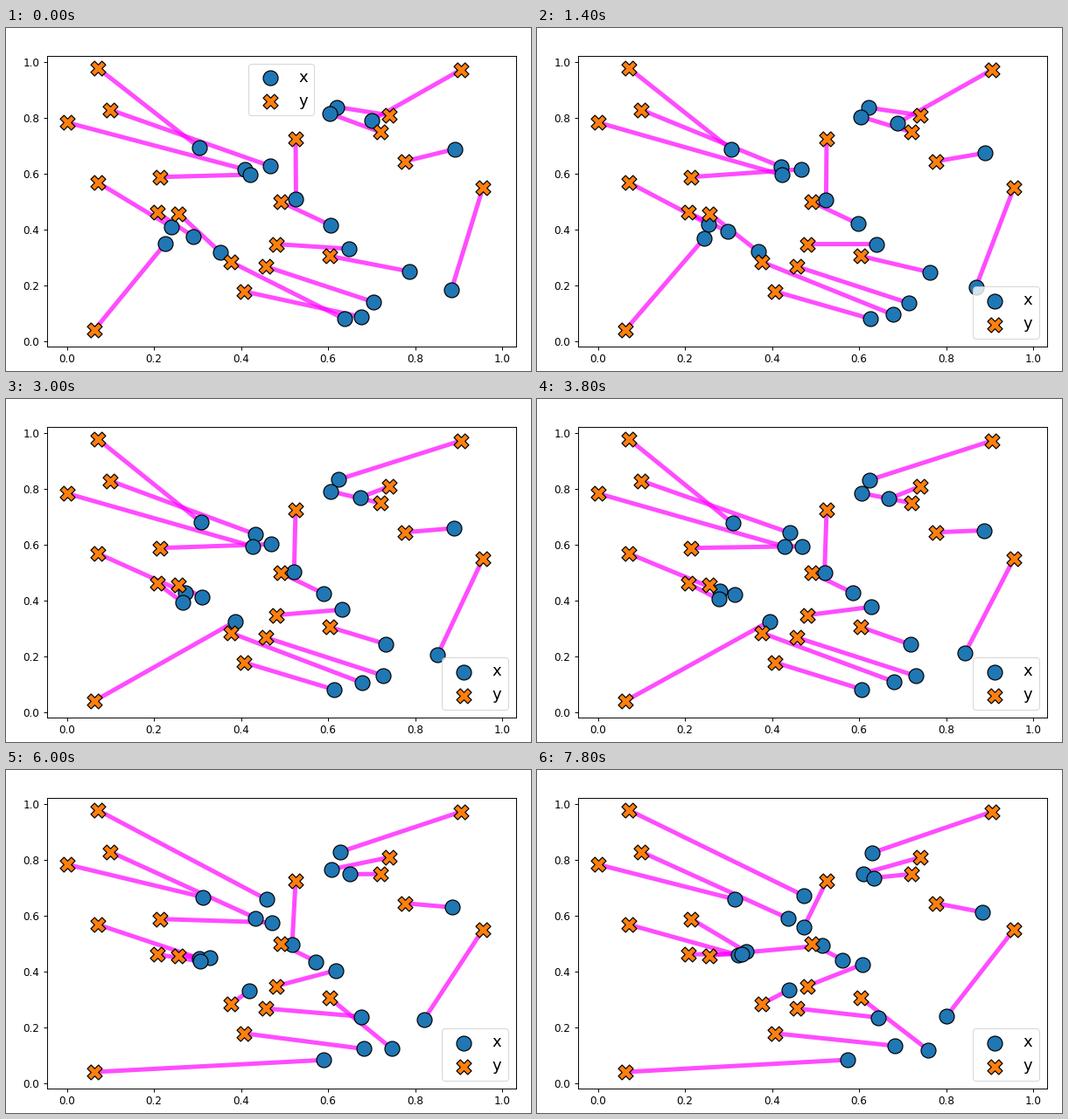
A matplotlib script that plays this animation: 600x393 px, repeating every 8 s.

```python
import numpy as np
import matplotlib.pyplot as plt
from matplotlib.animation import FuncAnimation
from matplotlib.collections import LineCollection

W, H, DPI = 600, 393, 72          # at 72 dpi one point is one pixel
FRAMES, INTERVAL = 40, 200
LEFT, RIGHT, TOP, BOTTOM = 46.5, 582.5, 31.5, 364.5
ORIGIN = np.array([69.6, 358.5])
UNIT = np.array([497.4, -319.5])  # pixels per data unit


def to_data(points):
    return (np.array(points) - ORIGIN) / UNIT


START = to_data([
    (221, 137), (301.5, 158), (273, 162), (279, 168), (189, 228),
    (214, 239), (182, 247), (245, 257), (331.4, 196.3), (371, 226),
    (392, 253), (461.5, 279), (420.3, 314), (406, 331), (386.5, 333.3),
    (509, 300), (378, 90.5), (369.5, 97.8), (418, 105.7), (513, 138.7)])
END = to_data([
    (226.3, 148.2), (305, 179.8), (305, 144), (287, 170), (230, 212),
    (239, 208), (234.5, 211), (288, 252), (325.7, 201.2), (349.5, 217.6),
    (372, 222.7), (390, 283.6), (447.3, 321), (409.3, 316), (355.4, 332),
    (468.3, 281.7), (382.8, 95), (372.7, 118.5), (385, 123.5), (509.5, 163)])
TARGETS = to_data([
    (105, 46), (119, 93.7), (70, 108.3), (105.3, 177.2), (176.3, 170.7),
    (172.7, 211.2), (197.3, 212.5), (101, 346), (257, 268), (271.6, 301.7),
    (296.6, 273.2), (308.7, 247.6), (370, 261.3), (313.5, 199), (331, 127),
    (427.7, 119.2), (438.4, 100), (520, 47.8), (456.3, 152.7), (545, 183)])


def assign(cost):
    """Hungarian algorithm: the column matched to every row."""
    n = len(cost)
    u, v = np.zeros(n), np.zeros(n + 1)
    owner = np.full(n + 1, -1)    # row held by each column, last is virtual
    for row in range(n):
        owner[n] = row
        col = n
        best = np.full(n, np.inf)
        prev = np.full(n, n)
        used = np.zeros(n + 1, bool)
        while owner[col] >= 0:
            used[col] = True
            r = owner[col]
            slack = cost[r] - u[r] - v[:n]
            better = ~used[:n] & (slack < best)
            best[better] = slack[better]
            prev[better] = col
            free = np.where(used[:n], np.inf, best)
            nxt = int(free.argmin())
            delta = free[nxt]
            u[owner[used]] += delta
            v[used] -= delta
            best[~used[:n]] -= delta
            col = nxt
        while col != n:
            owner[col] = owner[prev[col]]
            col = prev[col]
    return np.argsort(owner[:n])


fig = plt.figure(figsize=(W / DPI, H / DPI), dpi=DPI, facecolor="white")
ax = fig.add_axes([LEFT / W, 1 - BOTTOM / H, (RIGHT - LEFT) / W, (BOTTOM - TOP) / H])
low, high = to_data([(LEFT, BOTTOM), (RIGHT, TOP)])
ax.set(xlim=(low[0], high[0]), ylim=(low[1], high[1]))
ax.set_xticks(np.arange(0, 1.1, 0.2))
ax.set_yticks(np.arange(0, 1.1, 0.2))
ax.tick_params(length=4.2, width=0.96, pad=4.2, labelsize=12)
for spine in ax.spines.values():
    spine.set_linewidth(0.96)

links = LineCollection([], colors="magenta", alpha=0.7, linewidths=5,
                       capstyle="projecting", zorder=0)
ax.add_collection(links, autolim=False)
style = dict(s=288, edgecolors="black", linewidths=1.2)
dots = ax.scatter(*START.T, color="C0", label="x", zorder=2, **style | {"edgecolors": None}) \
    if False else ax.scatter(*START.T, c="C0", label="x", zorder=2, **style)
ax.scatter(*TARGETS.T, c="C1", marker="X", label="y", zorder=3, **style)
legend = ax.legend(loc="upper center", fontsize=18)


def update(k):
    x = START + (END - START) * k / (FRAMES - 1)
    cost = ((x[:, None] - TARGETS[None]) ** 2).sum(axis=2)
    links.set_segments(np.stack([x, TARGETS[assign(cost)]], axis=1))
    dots.set_offsets(x)
    legend.set_loc("upper center" if k < 7 else "lower right")
    return links, dots, legend


anim = FuncAnimation(fig, update, frames=FRAMES, interval=INTERVAL,
                     repeat=True, repeat_delay=0)
plt.show()
```
